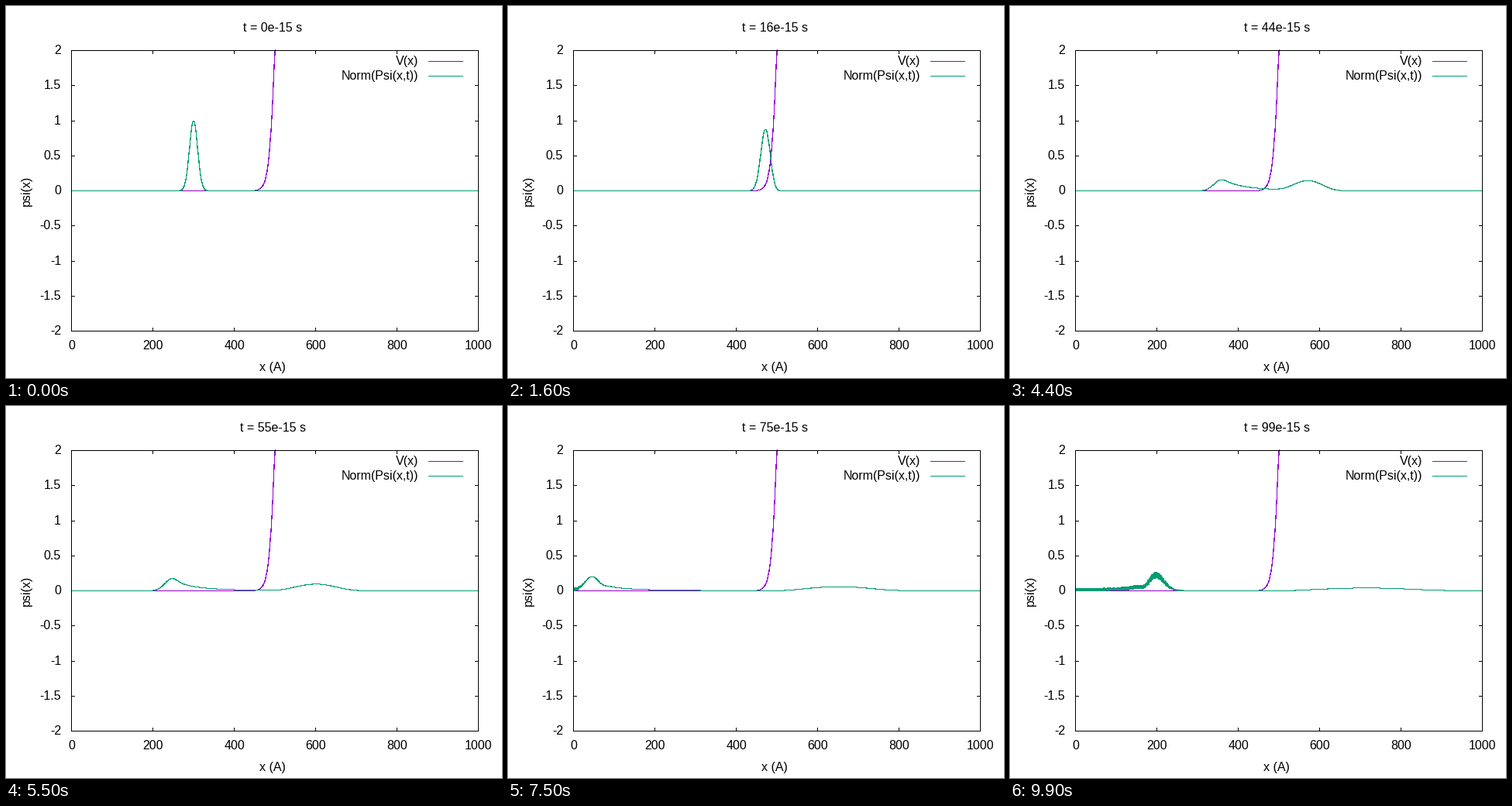
A matplotlib script for the animation above (10000 ms loop, 640x480 px).

```python
import numpy as np
import matplotlib.pyplot as plt
from matplotlib.animation import FuncAnimation

plt.rcParams["font.family"] = "Liberation Sans"
plt.rcParams["path.simplify"] = False

W, H, DPI = 640, 480, 100
FRAMES, INTERVAL = 100, 100
PX = 72 / DPI                      # one pixel in points
PURPLE, GREEN = "#9400d3", "#009e73"
LEFT, RIGHT, TOP, BOTTOM = 84.5, 609.5, 57.5, 419.5

# Units: angstrom, femtosecond, electronvolt
HBAR, H2M = 0.6582, 3.81           # hbar and hbar^2 / 2m
LENGTH, DX, MODES = 1000, 0.5, 600
X0, SIGMA, K0 = 300, 10, 1.01      # starting wave packet
V0, STEP_X, STEP_W = 4.0, 500, 7.5  # smooth potential step
DT = 0.1                           # Crank-Nicolson time step


def potential(x):
    return V0 / (1 + np.exp(-(x - STEP_X) / STEP_W))


def density(x, times):
    """|psi|^2 for a packet in a box with hard walls, one column per time."""
    k = np.arange(1, MODES + 1) * np.pi / LENGTH
    basis = np.sqrt(2 / LENGTH) * np.sin(np.outer(x, k))
    ham = basis.T @ (potential(x)[:, None] * basis) * DX + np.diag(H2M * k**2)
    energy, vecs = np.linalg.eigh(ham)
    states = basis @ vecs
    start = np.exp(-(x - X0)**2 / (4 * SIGMA**2) + 1j * K0 * x)
    coef = states.T @ start * DX
    omega = 2 / DT * np.arctan(energy * DT / (2 * HBAR))
    psi = states @ (coef[:, None] * np.exp(-1j * np.outer(omega, times)))
    return np.abs(psi)**2


def px(x):
    return np.floor(LEFT + np.asarray(x) * (RIGHT - LEFT) / LENGTH) + 0.5


def py(v):
    return np.floor((TOP + BOTTOM) / 2 - np.asarray(v) * (BOTTOM - TOP) / 4) + 0.5


xs = np.arange(0, LENGTH + DX, DX)
norm = density(xs, np.arange(FRAMES))

fig = plt.figure(figsize=(W / DPI, H / DPI), dpi=DPI, facecolor="white")
ax = fig.add_axes([0, 0, 1, 1])
ax.set_xlim(0, W)
ax.set_ylim(H, 0)
ax.axis("off")


def line(x, y, color="black", z=1):
    return ax.plot(x, y, color=color, lw=PX, antialiased=False, snap=False,
                   solid_capstyle="projecting", solid_joinstyle="miter"
                   if color == "black" else "round", zorder=z)[0]


def label(x, y, text, ha="center", **kw):
    return ax.text(x, y, text, ha=ha, va="baseline", fontsize=16 * PX, **kw)


# Ticks and their labels
for value in range(0, LENGTH + 1, 200):
    x = px(value)
    line([x, x], [BOTTOM, BOTTOM - 4])
    line([x, x], [TOP, TOP + 4])
    label(x, 443, str(value))
for value in np.arange(-2, 2.5, 0.5):
    y = py(value)
    line([LEFT, LEFT + 4], [y, y])
    line([RIGHT, RIGHT - 4], [y, y])
    label(71, y + 4.5, f"{value:g}", "right")

line([LEFT, RIGHT, RIGHT, LEFT, LEFT], [TOP, TOP, BOTTOM, BOTTOM, TOP], z=4)

# Legend
for y, name, color in ((71.5, "V(x)", PURPLE), (90.5, "Norm(Psi(x,t))", GREEN)):
    label(532.5, y + 4.5, name, "right")
    line([545.5, 589.5], [y, y], color)

label(344, 471, "x (A)")
label(31, 238.5, "psi(x)", rotation=90, rotation_mode="anchor")
title = label(344.5, 33, "")

below = xs[potential(xs) <= 2]
line(px(below), py(potential(below)), PURPLE, 2)
wave = line(px(xs), py(norm[:, 0]), GREEN, 3)


def update(i):
    title.set_text(f"t = {i}e-15 s")
    wave.set_ydata(py(norm[:, i]))
    return title, wave


anim = FuncAnimation(fig, update, frames=FRAMES, interval=INTERVAL,
                     repeat=True, repeat_delay=0, blit=False)
plt.show()
```
